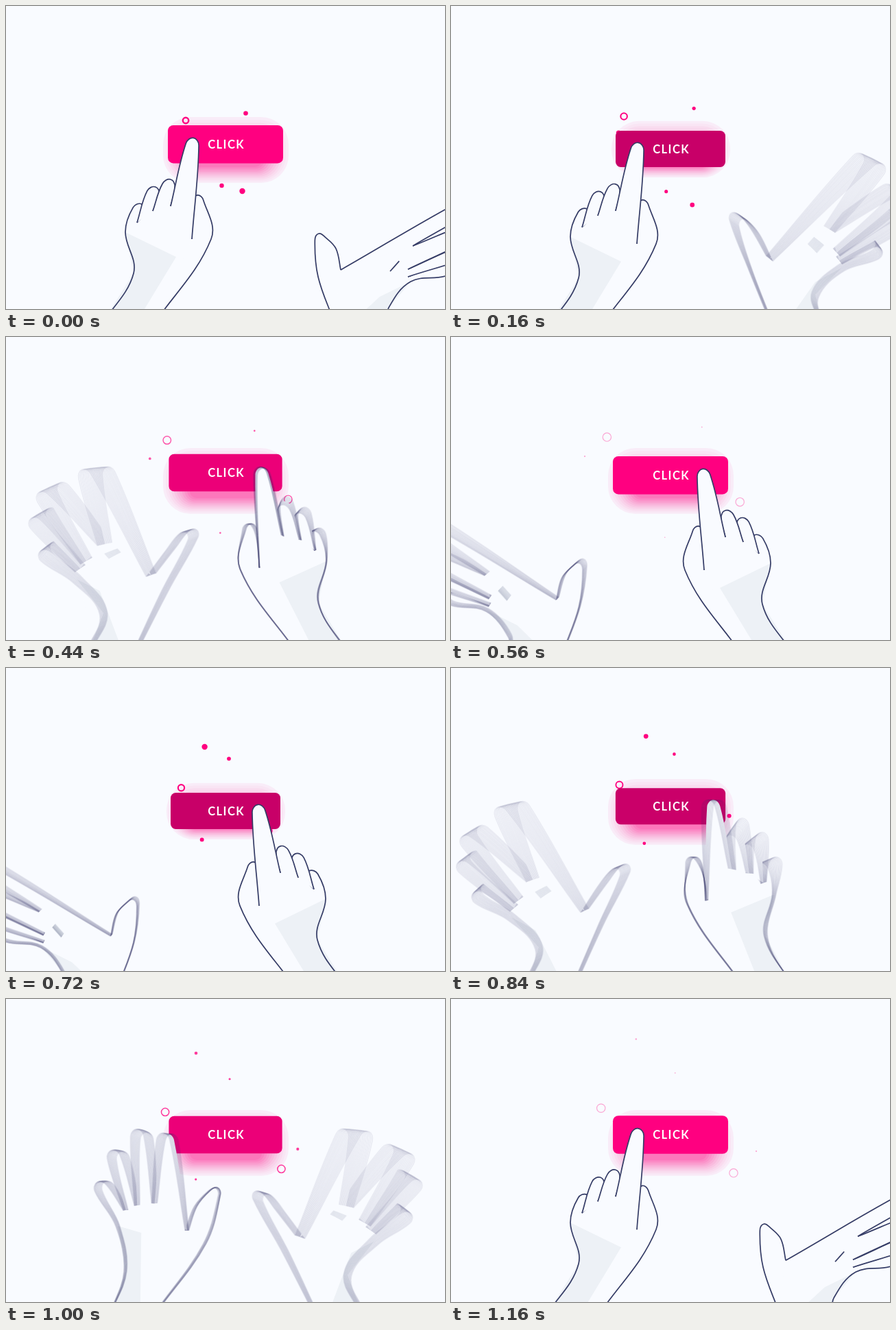
Animation, 640 px wide and 442 px high, one loop 1.2 s. Source, as an HTML page with a canvas:

```html
<!DOCTYPE html>
<html lang="en">
<head>
<meta charset="utf-8">
<title>Click</title>
<style>
  html, body { margin: 0; width: 100%; height: 100%; overflow: hidden; background: #f9fbff; }
  canvas { display: block; width: 640px; height: 442px; }
</style>
</head>
<body>
<canvas id="stage" width="640" height="442"></canvas>
<script>
const ctx = document.getElementById('stage').getContext('2d');
const W = 640, H = 442, LOOP = 1200, STEP = 40, HALF = 560;
const PAPER = '#f9fbff', INK = '#353c66', SHADE = '#edf1f6', PINK = '#ff0080';
const SHUTTER = 22, SAMPLES = 16;

// Key points of the left hand; w1..w3 are the webs between the fingers
const POINT = {
  arm: [138, 466], wrist: [186, 390], side: [174, 330],
  pinky: [198, 289], w1: [191, 316], ring: [218, 264], w2: [214, 299],
  middle: [240, 253], w3: [240, 292], index: [273, 192.5], crook: [271, 340],
  bend: [271, 305], thumb: [279, 276], heel: [299, 340], cuff: [214, 466], shade: [248, 366]
};
const OPEN = {
  arm: [150, 460], wrist: [171, 398], side: [159, 332],
  pinky: [131, 268], w1: [170, 309], ring: [152, 221], w2: [186, 302],
  middle: [188, 190], w3: [211, 298], index: [226, 195], crook: [260, 338],
  bend: [273, 303], thumb: [304, 276], heel: [286, 358], cuff: [218, 455], shade: [192, 342]
};
const AWAY = {
  arm: [84, 462], wrist: [82, 440], side: [50, 402],
  pinky: [-8, 382], w1: [54, 395], ring: [-50, 350], w2: [54, 384],
  middle: [-60, 318], w3: [47, 350], index: [-60, 275], crook: [152, 385],
  bend: [159, 354], thumb: [184, 332], heel: [185, 395], cuff: [162, 460], shade: [95, 424]
};
// Parts that trail behind when the hand turns
const LAG = { index: 1.4, w3: 1.2, crook: 1.2, bend: 1.8, thumb: 1.8, wrist: 1.5 };
const PIVOT = [190, 520];

// Particles leave the button centre along rays: start offset, growth, radius (0 = ring)
const BURSTS = [
  [[-58, -35, .64, 0], [29.5, -45.5, .59, 3.3], [-5.5, 60, .54, 3.2],
   [24.5, 68, 1.11, 4.2], [-56, -12.5, 1.32, 4.5], [55, 21, .9, 0]],
  [[-25, -71.5, 1.08, 5], [4.5, -63, .53, 3.4], [-54.5, -23, .92, 0],
   [56, 9, 1.32, 4.5], [-30.5, 43, .63, 3.5], [55, 31, .72, 0]]
];

const lerp = (a, b, k) => a + (b - a) * k;
const clamp = v => Math.max(0, Math.min(1, v));
const wrap = t => (t % LOOP + LOOP) % LOOP;
const mix = (p, q, k) => [lerp(p[0], q[0], k), lerp(p[1], q[1], k)];
function ease(from, to, t) {
  const k = clamp((t - from) / (to - from));
  return k * k * (3 - 2 * k);
}

// Swing from p to q around the pivot below the stage
function swing(p, q, k) {
  const [a, b] = [p, q].map(([x, y]) => [x - PIVOT[0], PIVOT[1] - y]);
  const angle = lerp(Math.atan2(...a), Math.atan2(...b), k);
  const r = lerp(Math.hypot(...a), Math.hypot(...b), k);
  return [PIVOT[0] + r * Math.sin(angle), PIVOT[1] - r * Math.cos(angle)];
}

const curl = p => ease(250, 330, p) * (1 - ease(990, 1110, p));
const turn = p => p < 640 ? ease(310, 590, p) : lerp(1, -.06, ease(695, 1035, p));

function pressAge(t) {
  const u = wrap(t + 40);
  return (u >= HALF ? u - HALF : u) - 40;
}
const pressDepth = age => age < 320 ? Math.sin(Math.PI * (age + 40) / 360) : 0;
const squeeze = age => Math.min(clamp(age / 120), clamp(1 - (age - 270) / 260));

function handAt(p, dip) {
  const open = curl(p), away = turn(p);
  const dy = (dip - 3.7) * (1 - open + open * Math.max(0, 2 * away - 1));
  const hand = { away: clamp(away) };
  for (const key in POINT) {
    const k = away > 0 ? away ** (LAG[key] || 1) : away;
    const [x, y] = swing(POINT[key], swing(OPEN[key], AWAY[key], k), open);
    hand[key] = [x, y + dy];
  }
  return hand;
}

// Rounded fingertip: left, top and right point
function cap(a, tip, b, r) {
  const m = mix(a, b, .5), d = Math.hypot(tip[0] - m[0], tip[1] - m[1]);
  const ux = (tip[0] - m[0]) / d * r, uy = (tip[1] - m[1]) / d * r;
  return [[tip[0] - ux + uy, tip[1] - uy - ux], tip, [tip[0] - ux - uy, tip[1] - uy + ux]];
}
const finger = (a, tip, b) => [a, ...cap(a, tip, b, 9.5), b];

// Outlines from back to front; later ones cover earlier ones
const OUTLINES = [
  h => [h.arm, h.wrist, ...finger(h.side, h.pinky, h.w1)],
  h => [h.crook, h.bend, ...cap(h.crook, h.thumb, h.heel, 8), h.heel, h.cuff],
  h => finger(h.w1, h.ring, h.w2),
  h => finger(h.w2, h.middle, h.w3),
  h => finger(h.w3, h.index, h.crook),
  h => [.6, 1].map(k => [h.w3[0] + 33 * k * h.away, h.w3[1] + 37 * k * h.away])
];

// Smooth curve through the points, handles scaled to each span
function curve(pts) {
  const dir = i => {
    const p = pts[Math.max(0, i - 1)], q = pts[Math.min(pts.length - 1, i + 1)];
    const d = Math.hypot(q[0] - p[0], q[1] - p[1]) || 1;
    return [(q[0] - p[0]) / d, (q[1] - p[1]) / d];
  };
  ctx.beginPath();
  ctx.moveTo(...pts[0]);
  for (let i = 0; i + 1 < pts.length; i++) {
    const p = pts[i], q = pts[i + 1], u = dir(i), v = dir(i + 1);
    const h = Math.hypot(q[0] - p[0], q[1] - p[1]) * .36;
    ctx.bezierCurveTo(p[0] + u[0] * h, p[1] + u[1] * h, q[0] - v[0] * h, q[1] - v[1] * h, ...q);
  }
}

function fillPolygon(pts, color) {
  ctx.beginPath();
  pts.forEach(p => ctx.lineTo(...p));
  ctx.fillStyle = color;
  ctx.fill();
}

function drawHand(p, dip, mirrored) {
  const at = k => handAt(wrap(p + SHUTTER * k), dip);
  const mid = at(0), first = at(-.5), last = at(.5);
  const still = ['index', 'thumb'].every(key =>
    Math.hypot(first[key][0] - last[key][0], first[key][1] - last[key][1]) < .4);
  const n = still ? 1 : SAMPLES;
  const poses = still ? [mid] : Array.from({ length: n }, (_, i) => at(i / (n - 1) - .5));

  ctx.save();
  if (mirrored) { ctx.translate(W, 0); ctx.scale(-1, 1); }
  ctx.strokeStyle = INK;
  ctx.lineWidth = 1.7;
  ctx.lineJoin = 'round';
  const { arm, wrist, side, w1, w2, w3, crook, heel, cuff, shade } = mid;
  fillPolygon([arm, wrist, side, w1, w2, w3, crook, heel, cuff], PAPER);
  OUTLINES.forEach((outline, i) => {
    curve(outline(mid));
    ctx.fillStyle = PAPER;
    ctx.fill();
    if (i === 0) fillPolygon([arm, wrist, side, shade, mix(arm, cuff, .65)], SHADE);
    // Shutter blur: several faint outlines while the hand moves
    ctx.globalAlpha = still ? 1 : 1.25 / n;
    for (const pose of poses) {
      curve(outline(pose));
      ctx.stroke();
    }
    ctx.globalAlpha = 1;
  });
  ctx.restore();
}

function box(x, y, w, h, r) {
  ctx.beginPath();
  ctx.roundRect(x, y, w, h, r);
  ctx.fill();
}

function drawGlow(depth) {
  const k = clamp((depth - .35) / .65), n = 11;
  ctx.fillStyle = PINK;
  for (let i = 0; i < n; i++) {
    const f = i / (n - 1);
    const x = lerp(229 + 5 * k, 268, f);
    const top = lerp(162 + 6 * k, 205, f), end = lerp(258 - 8 * k, 235, f);
    ctx.globalAlpha = i ? lerp(.025, .1, f) : .06;
    box(x, top, 2 * (320.5 - x), end - top, lerp(40, 10, f));
  }
  ctx.globalAlpha = 1;
}

function drawParticles(t) {
  const age = t % 600, f = age / 600;
  ctx.fillStyle = ctx.strokeStyle = PINK;
  ctx.globalAlpha = clamp((690 - age) / 380);
  ctx.lineWidth = lerp(2.4, 1.1, f);
  for (const [dx, dy, growth, r] of BURSTS[t < 600 ? 0 : 1]) {
    const k = 1 + growth * f;
    ctx.beginPath();
    ctx.arc(320 + dx * k, 202 + dy * k, r ? r * (1 - .8 * f) : lerp(4.2, 6.3, f), 0, 7);
    if (r) ctx.fill(); else ctx.stroke();
  }
  ctx.globalAlpha = 1;
}

function drawButton(q, dip) {
  const s = 1 - .048 * q, w = 168 * s, h = 55.5 * s;
  ctx.fillStyle = `rgb(${lerp(255, 200, q)}, 0, ${lerp(128, 104, q)})`;
  box(320 - w / 2, 198 + dip - h / 2, w, h, 8 * s);
  ctx.fillStyle = '#fff';
  ctx.font = 'bold 16.5px Lato, sans-serif';
  ctx.letterSpacing = '1.4px';
  ctx.fillText('CLICK', 294.3, 204.1 + dip);
}

function draw(t) {
  const age = pressAge(t), depth = pressDepth(age), dip = 10.7 * depth;
  ctx.fillStyle = PAPER;
  ctx.fillRect(0, 0, W, H);
  drawGlow(depth);
  drawParticles(t);
  drawButton(squeeze(age), dip);
  drawHand(t, dip, false);
  drawHand(wrap(t - HALF), dip, true);
}

const start = performance.now();
function tick() {
  const t = performance.now() - start;
  draw(Math.floor((t + 4) / STEP) * STEP % LOOP);
  requestAnimationFrame(tick);
}
tick();
</script>
</body>
</html>
```
